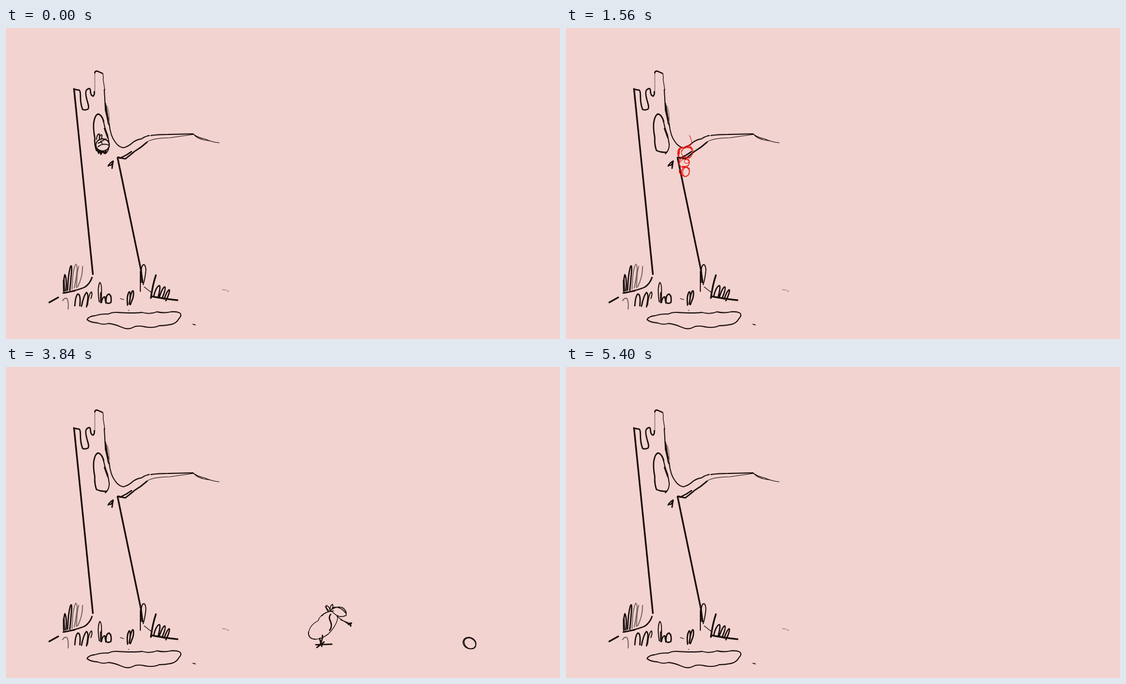
These frames come from a looping animation (998 by 561 pixels, 5440 ms). An HTML page:

```html
<!DOCTYPE html>
<html lang="en">
<head>
<meta charset="utf-8">
<title>Squirrel sketch</title>
<style>
html, body { margin: 0; width: 100%; height: 100%; overflow: hidden; background: #f2d3d0; }
svg { display: block; width: 100%; height: 100%; fill: none; stroke: #160b09; stroke-width: 1.8; stroke-linecap: round; stroke-linejoin: round; }
.thin { stroke-width: 1.2; }
.mid { stroke-width: 2.4; }
.bold { stroke-width: 3; }
.soft { opacity: .55; }
.pose, #guide, #nut { visibility: hidden; }
#guide { stroke: #e5430f; stroke-width: 1.6; }
#climb { stroke: #e5170e; }
#look, #run, #nut { stroke-width: 1.5; }
</style>
</head>
<body>
<svg viewBox="0 0 998 561">
  <g id="tree">
    <path class="bold" d="M122.500 110L139 272L156.500 444M201 234L243 436L246 459"/>
    <path class="mid" d="M122 110Q128 112 132 112Q134 114 134 121Q134 137 138 147Q143 149 148 146Q150 143 147 134Q141 114 146 111Q151 107 152 112Q152 122 157 123Q160 120 159 115"/>
    <path class="thin soft" d="M160 116L160 80"/>
    <path class="mid" d="M160 81Q160 77 165 78L174 82"/>
    <path class="thin" d="M174 82Q176 85 175 93L178 112"/>
    <path d="M177 111L178 128L179 148L185 174M180 139L183 158M186 173Q188 195 197 206Q203 215 212 216Q222 213 229 206Q236 201 244 200Q251 195 258 194M261 194Q273 192 292 192L337 191"/>
    <path class="mid" d="M179 136L180 150L184 163L184 171"/>
    <path class="thin soft" d="M182 141Q187 153 186 178"/>
    <path class="thin" d="M337 191Q346 198 358 200Q371 206 384 207M339 193Q346 200 357 202L369 204M250 209Q257 202 270 200Q282 198 295 198Q316 195 338 192"/>
    <path class="mid" d="M202 233Q208 235 215 236Q223 230 231 223Q243 216 254 206M205 235L217 229L226 223"/>
    <path class="mid" d="M184 249Q188 242 193 240L191 253M185 247Q189 250 192 243"/>
    <path class="mid" d="M181 224Q171 225 163 221Q159 210 160 198Q157 183 158 171Q160 157 166 155Q173 157 176 169"/>
    <path d="M175 165Q178 182 183 193L186 210Q186 221 179 227M177 181L183 198"/>
  </g>
  <g id="ground">
    <path class="mid" d="M155 450Q151 462 141 468Q126 474 103 478M105 478L124 474"/>
    <path class="bold" d="M78 495L94 486M262 484Q282 488 309 491M105 474L104 455M171 495L171 478"/>
    <path class="mid" d="M104 475Q103 454 106 445Q110 452 108 474M111 473Q112 444 116 431Q119 424 118 440L115 473"/>
    <path class="soft" d="M119 471Q120 434 126 426Q131 428 123 469M127 468Q128 437 131 430M129 467Q138 450 138 430M102 492Q105 486 110 488Q113 494 112 507"/>
    <path class="mid" d="M124 501Q125 484 129 480Q135 479 133 501M136 502Q140 482 145 477Q150 480 145 503"/>
    <path d="M147 500Q149 479 154 476Q156 480 153 488M168 494Q164 469 169 459Q174 461 171 493"/>
    <path class="mid" d="M172 495Q174 484 178 485L180 496M180 494Q180 480 186 480Q191 484 189 495Q183 499 180 494"/>
    <path class="thin" d="M206 488L212 490M221 509v1M249 467L263 478"/>
    <path class="mid" d="M219 500Q217 482 222 476Q225 475 223 493M222 498Q225 477 228 474Q231 474 229 486L224 499"/>
    <path d="M242 439V475M243 459Q242 435 246 428Q251 424 252 436Q251 451 247 463"/>
    <path class="bold" d="M261 487Q264 464 270 446"/>
    <path class="mid" d="M266 484Q270 468 275 465Q280 462 274 486M276 486Q282 468 286 467Q289 469 281 488M285 489Q290 474 294 472Q296 476 288 492"/>
    <path d="M146 526Q149 520 160 519Q172 515 184 516Q192 512 201 513Q230 515 245 513Q259 517 272 512Q285 515 297 512Q307 511 313 514Q318 518 311 525Q307 533 296 535Q286 537 276 537Q265 542 250 539Q236 536 229 540Q220 545 209 540Q196 534 184 533Q175 536 165 532Q151 531 146 526"/>
    <path d="M337 534.500L341 535.500"/>
    <path class="thin soft" d="M390 472L396 472.500M398 474L401 475"/>
  </g>

  <g id="guide">
    <path class="mid" d="M166 207Q167 198 175 197Q181 203 178 211Q173 217 167 212Q166 203 178 199M339 167Q344 159 352 160L360 165Q354 171 344 171L339 167M345 168L350 162"/>
    <path d="M173 194Q181 192 186 204L175 214M179 203Q189 198 198 202Q208 205 213 194Q221 185 230 176L241 165"/>
    <ellipse cx="197" cy="194" rx="8" ry="8"/>
    <path d="M192 190Q202 184 205 177Q210 168 222 167Q235 158 251 157M200 189Q209 176 220 169M204 198Q218 182 228 173Q240 169 249 158M195 197Q202 195 214 178"/>
    <ellipse class="mid" cx="237" cy="164" rx="12" ry="4" transform="rotate(-27 237 164)"/>
    <path d="M247 161Q260 150 272 147Q284 146 287 154Q277 162 263 161Q257 155 268 151M262 157Q274 148 287 156Q297 151 309 161M277 159Q287 150 298 151"/>
    <ellipse class="mid" cx="291" cy="163" rx="12" ry="12"/>
    <path class="mid" d="M302 159Q317 164 331 176L316 174Q309 170 302 174"/>
    <path d="M311 162Q326 165 332 175M326 170L341 163"/>
    <path class="thin" d="M317 176Q335 184 347 180Q356 176 357 171M335 187Q337 179 340 172M308 180Q322 184 334 177"/>
  </g>

  <g class="pose" id="nest">
    <ellipse cx="174" cy="211" rx="12" ry="11"/>
    <path d="M163 201Q164 191 168 191Q169 195 168 200Q169 191 173 193L172 200M166 214Q174 207 185 211M171 204L173 208M166 208L180 200"/>
    <path class="mid" d="M164 219L167 226L169 221L171 228L174 222L177 226L180 222"/>
  </g>
  <g class="pose" id="sit">
    <path class="mid" d="M291 145Q294 137 303 136Q310 139 319 139Q313 145 316 156Q320 171 314 185L308 190M312 147Q316 160 314 178"/>
    <path d="M299 151Q292 150 286 155Q282 163 285 171Q292 176 298 171Q302 162 299 151M300 172Q308 180 305 189M310 145Q307 148 311 157"/>
    <path class="mid" d="M294 151Q293 144 298 146L299 157M283 174Q276 184 281 191Q289 195 302 192M280 176Q284 177 287 184L293 179"/>
    <path class="bold" d="M290 160V165M275 194H285M300 193H309"/>
  </g>
  <g class="pose" id="climb">
    <path class="mid" d="M212 376Q201 375 199 387Q199 399 204 405Q206 396 203 386Q205 378 216 375M202 382V398"/>
    <path d="M223 336Q233 347 235 360Q232 364 226 366L231 371Q239 368 243 379"/>
    <path d="M211 387Q213 368 230 366Q246 374 244 389Q240 404 225 404Q211 400 209 388Q215 370 235 373Q248 387 240 400M216 373Q233 367 243 377"/>
    <ellipse cx="225" cy="419" rx="15" ry="16"/>
    <path d="M212 408Q220 399 238 403M212 421Q219 403 239 411Q244 430 222 431M208 411Q207 428 217 435"/>
    <ellipse cx="231" cy="414" rx="7" ry="6"/>
    <ellipse class="mid" cx="234" cy="446" rx="12" ry="14"/>
    <ellipse cx="236" cy="445" rx="10" ry="14"/>
    <path class="mid" d="M222 433Q231 429 244 434M215 446Q217 455 225 457M218 443L225 453"/>
  </g>
  <g class="pose" id="crouch">
    <ellipse class="mid" cx="548" cy="481" rx="18" ry="18"/>
    <ellipse class="thin" cx="550" cy="483" rx="18" ry="17"/>
    <path class="mid" d="M530 480Q532 465 550 460Q571 457 590 466M590 472Q602 472 607 485Q607 494 601 497Q588 496 587 487M588 470Q591 459 599 457L594 468M592 460L587 468"/>
    <path d="M560 463Q578 462 592 473M590 474L593 493M565 495Q575 498 588 490M571 485Q574 496 581 502M564 474Q568 482 566 491"/>
    <path class="thin" d="M537 493Q546 480 562 490M573 490L585 484M590 480Q596 488 604 493"/>
    <path class="bold" d="M533 500Q545 497 562 500Q549 503 534 501M572 500L582 503"/>
  </g>
  <g class="pose" id="look">
    <path class="thin" d="M577 443Q566 447 562 458Q546 466 545 481Q546 492 560 491Q576 488 585 477Q598 462 598 448"/>
    <path d="M545 478Q544 491 558 491M569 449Q575 441 590 440"/>
    <path class="mid" d="M585 446Q580 451 585 460Q588 469 583 475"/>
    <path d="M586 438Q595 431 606 434Q614 439 613 448Q602 453 594 447Q587 441 584 439M588 434Q602 430 613 445M596 450L617 464M603 456L620 463"/>
    <path class="bold" d="M617 464L622 462M620 464L621 467"/>
    <path d="M582 440Q576 435 577 430Q583 432 584 440Q583 431 588 428Q591 432 586 438M580 441L575 432"/>
    <path class="mid" d="M570 484Q571 491 565 502M558 501L587 500M560 506L573 496M565 490L569 504"/>
  </g>
  <g class="pose" id="run">
    <path d="M478 474Q473 465 479 458Q488 453 500 456Q506 460 499 468Q490 476 478 474Q475 467 481 459M488 456Q486 444 490 443Q494 446 492 455M494 454Q494 444 498 443Q500 448 497 456"/>
    <path class="bold" d="M485 470L496 464"/>
    <ellipse class="thin" cx="511" cy="471" rx="15" ry="16"/>
    <path class="thin" d="M500 457Q516 450 528 460Q533 472 525 485M499 474Q507 457 526 465M523 465Q536 450 557 458Q573 470 570 487M522 490Q543 497 564 478M530 459Q548 470 558 493"/>
    <ellipse class="mid" cx="540" cy="475" rx="20" ry="19"/>
    <ellipse cx="543" cy="474" rx="20" ry="20"/>
    <ellipse cx="557" cy="487" rx="10" ry="12"/>
    <path class="mid" d="M545 496Q556 503 573 502L568 495M548 501Q558 504 572 503M509 503H514"/>
    <path d="M509 486Q518 491 514 502"/>
    <path class="thin" d="M493 494Q493 490 497 490"/>
  </g>
  <g id="nut">
    <ellipse cx="0" cy="0" rx="12" ry="10"/>
    <ellipse cx="1" cy="0" rx="11.500" ry="9" transform="rotate(12)"/>
  </g>
</svg>
<script>
const LOOP = 5440;
const $ = id => document.getElementById(id);
const lerp = (a, b, u) => a + (b - a) * u;
const bump = u => Math.abs(Math.sin(Math.PI * u));
const clamp = u => Math.max(0, Math.min(1, u));
const poses = [...document.querySelectorAll('.pose')];
const pivots = { nest: [174, 211], sit: [298, 194], climb: [222, 398], crouch: [568, 480], look: [583, 467], run: [524, 474] };

// Each scene: start, end, step, pose, and u -> [dx, dy, turn, scale x, scale y]
const rest = () => [0, 0];
const scenes = [
  [0, 80, 80, 'nest', rest],
  [80, 560, 80, 'crouch', u => [
    lerp(lerp(178, 222, u), lerp(222, 298, u), u) - 568,
    lerp(lerp(204, 150, u), lerp(150, 180, u), u) - 480,
    lerp(-40, 18, u), .58]],
  [640, 800, 80, 'sit', u => [0, 0, 0, lerp(1.12, 1, u), lerp(.8, 1, u)]],
  [1040, 1120, 80, 'sit', u => [0, 0, 0, lerp(1.05, 1, u), lerp(.93, 1, u)]],
  [1200, 1560, 40, 'climb', u => [lerp(288, 214, u) - 222, lerp(172, 230, u * u) - 398, lerp(90, 12, u), .6]],
  [1600, 2040, 40, 'climb', u => [lerp(-6, 0, u), lerp(-130, 0, u), lerp(8, 0, u), lerp(.7, 1, u)]],
  [2120, 2200, 80, 'climb', () => [3, 6, 0, 1, .95]],
  [2200, 2680, 80, 'crouch', u => [lerp(270, 540, u) - 568, -46 * bump(2 * u), 22 * -Math.cos(2 * Math.PI * u) * bump(2 * u)]],
  [2760, 2840, 80, 'crouch', rest],
  [2840, 2920, 80, 'crouch', () => [-2, -6, -22]],
  [2920, 3400, 480, 'look', rest],
  [3400, 3840, 40, 'look', u => [0, 0, -14 * Math.sin(2 * Math.PI * u) * (1 - u)]],
  [3960, 4240, 40, 'look', u => [lerp(0, -22, u), -78 * bump(u)]],
  [4280, 4400, 40, 'run', u => [lerp(30, 0, u), 0, 0, lerp(.75, 1, u), 1]],
  [4440, 4520, 80, 'run', () => [-18, 0]],
  [4520, 4840, 80, 'run', u => [lerp(-40, -212, u), -22 * bump(2 * u), 10 * Math.sin(4 * Math.PI * u)]],
  [5000, 5240, 240, 'run', () => [-214, 3, 0, 1, .95]],
  [5240, 5400, 80, 'run', u => [lerp(-248, -286, u), lerp(0, 50, u), lerp(-18, -70, u), lerp(.9, .5, u)]],
  [5400, LOOP, 40, null, rest]
];

function drawNut(t) {
  const now = Math.floor(t / 40) * 40;
  const on = now >= 3480 && now < 4240;
  $('nut').style.visibility = on ? 'visible' : 'hidden';
  if (!on) return;
  const u = clamp((now - 3480) / 360);
  const x = now <= 3840 ? lerp(622, 835, u) : lerp(835, 990, (now - 3840) / 400);
  const y = u < .6 ? lerp(452, 498, u / .6) - 32 * bump(u / .6) : 498 - 22 * bump((u - .6) / .4);
  $('nut').setAttribute('transform', `translate(${x} ${y}) rotate(${25 + (x - 835) * 4})`);
}

function draw(t) {
  const [from, to, step, id, move] = scenes.filter(s => s[0] <= t).pop();
  const u = clamp(Math.floor((t - from) / step) * step / (to - from));
  for (const p of poses) p.style.visibility = p.id === id ? 'visible' : 'hidden';
  if (id) {
    const [dx, dy, turn = 0, sx = 1, sy = sx] = move(u);
    const [px, py] = pivots[id];
    $(id).setAttribute('transform',
      `translate(${px + dx} ${py + dy}) rotate(${turn}) scale(${sx} ${sy}) translate(${-px} ${-py})`);
  }
  $('guide').style.visibility = t >= 80 && t < 1200 ? 'visible' : 'hidden';
  drawNut(t);
}

function tick() {
  draw(performance.now() % LOOP);
  requestAnimationFrame(tick);
}
tick();
</script>
</body>
</html>
```
